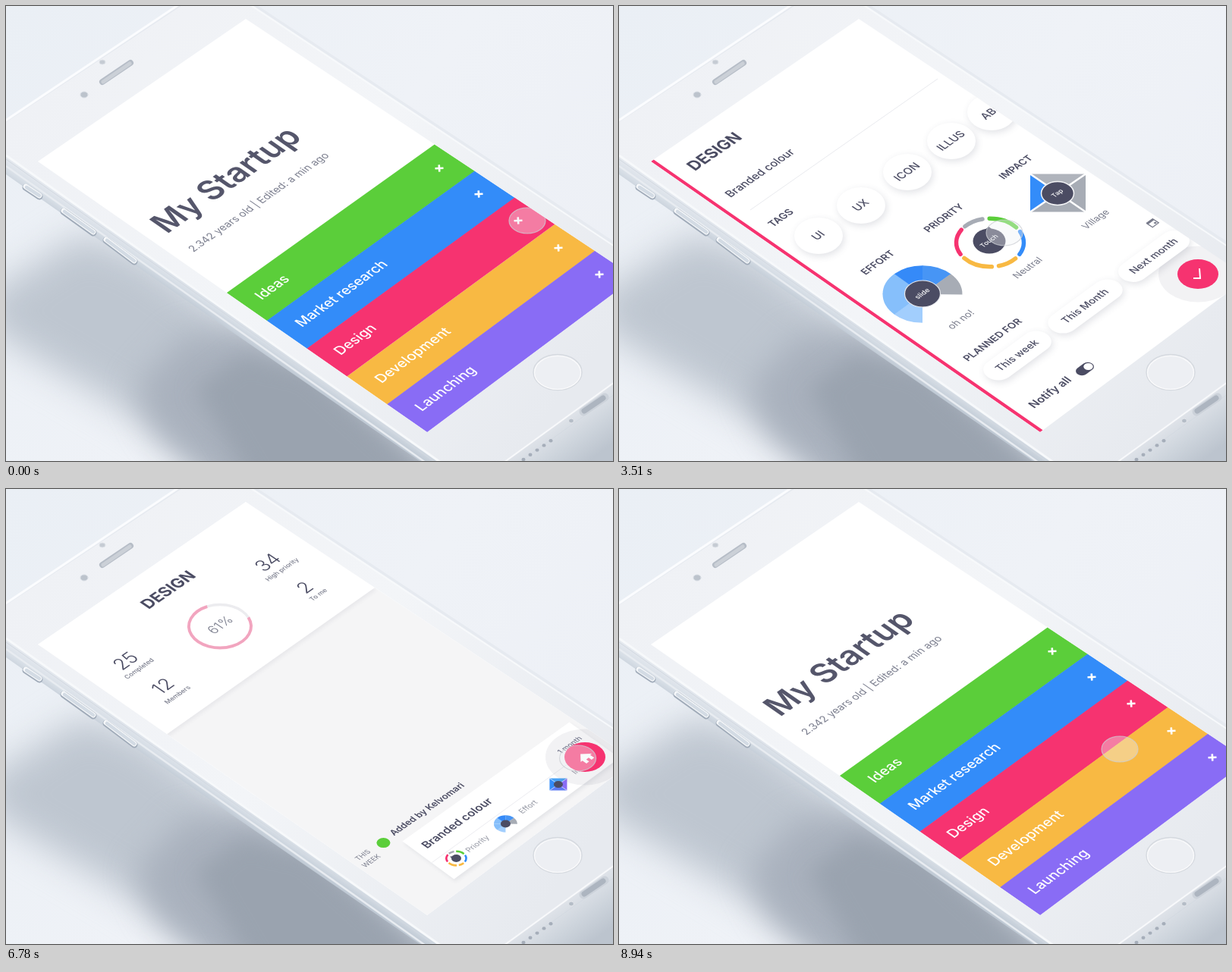
These frames come from a looping animation (800x600 px, 8.97 s). An HTML page with a canvas:

```html
<!DOCTYPE html>
<html lang="en">
<head>
<meta charset="utf-8">
<title>Startup planner</title>
<style>
html, body { margin: 0; width: 100%; height: 100%; overflow: hidden; background: #edf1f6; }
canvas { display: block; width: 800px; height: 600px; }
</style>
</head>
<body>
<canvas id="stage" width="800" height="600"></canvas>
<script>
const LOOP = 8970, W = 375, H = 667, SKEW = 6.4e-5, RAD = Math.PI / 180;
const PINK = '#f63370', BLUE = '#338cf9', GREEN = '#5bce3a', ORANGE = '#f8b943', PURPLE = '#896cf5';
const INK = '#4b4c63', GREY = '#a7acb5', SOFT = '#777a8a';
const canvas = document.getElementById('stage');
let ctx = canvas.getContext('2d');
let ox = 0, oy = 0;

const clamp = v => Math.max(0, Math.min(1, v));
const ramp = (t, a, b) => clamp((t - a) / (b - a));
const mix = (a, b, p) => a + (b - a) * p;
const inOut = p => p < .5 ? 4 * p * p * p : 1 - Math.pow(2 - 2 * p, 3) / 2;
const out = p => 1 - Math.pow(1 - p, 3);

// Tilted phone screen: screen units to stage pixels, and back
function project(X, Y) {
  return [42 + .7307 * X + .7691 * Y, 205 - .5013 * X + .5352 * Y - SKEW * X * Y];
}
function unproject(x, y) {
  let X = 0, Y = 0;
  for (let i = 0; i < 4; i++) {
    const dx = x - 42, dy = y - 205 + SKEW * X * Y;
    X = .6891 * dx - .9903 * dy;
    Y = .6455 * dx + .9409 * dy;
  }
  return [X, Y];
}
// Local tilted axes with their origin at a stage point
function at(x, y) {
  const [X, Y] = unproject(x, y);
  ctx.setTransform(.7307, -.5013 - SKEW * Y, .7691, .5352 - SKEW * X, x + ox, y + oy);
}
function flat() { ctx.setTransform(1, 0, 0, 1, ox, oy); }
// Moves what follows down the screen by some units
function shift(units) {
  ox = .7691 * units;
  oy = .5345 * units;
  flat();
}

function poly(points, fill) {
  ctx.beginPath();
  points.forEach(p => ctx.lineTo(p[0], p[1]));
  ctx.closePath();
  if (fill) { ctx.fillStyle = fill; ctx.fill(); }
}
function panel(X, Y, w, h, fill) {
  flat();
  poly([project(X, Y), project(X + w, Y), project(X + w, Y + h), project(X, Y + h)], fill);
}
function line(x1, y1, x2, y2, color, width) {
  ctx.beginPath();
  ctx.moveTo(x1, y1);
  ctx.lineTo(x2, y2);
  ctx.strokeStyle = color;
  ctx.lineWidth = width;
  ctx.stroke();
}
function oval(x, y, rx, ry, fill, stroke, width) {
  ctx.beginPath();
  ctx.ellipse(x, y, rx, ry, 0, 0, 7);
  if (fill) { ctx.fillStyle = fill; ctx.fill(); }
  if (stroke) { ctx.strokeStyle = stroke; ctx.lineWidth = width || 1; ctx.stroke(); }
}
function text(s, x, y, size, weight, color, align) {
  at(x, y);
  ctx.font = `${weight} ${size}px Inter, "Open Sans", sans-serif`;
  ctx.textAlign = align || 'left';
  ctx.textBaseline = align ? 'middle' : 'alphabetic';
  ctx.fillStyle = color;
  ctx.fillText(s, 0, 0);
  flat();
}
function shadow(alpha, blur = 10) {
  ctx.shadowColor = `rgba(70,75,100,${alpha})`;
  ctx.shadowBlur = alpha ? blur : 0;
  ctx.shadowOffsetX = alpha ? 2 : 0;
  ctx.shadowOffsetY = alpha ? 3 : 0;
}
function capsule(x, y, w, h, fill) {
  at(x, y);
  ctx.beginPath();
  ctx.roundRect(-w / 2, -h / 2, w, h, h / 2);
  ctx.fillStyle = fill;
  ctx.fill();
  flat();
}
function gradient(x1, y1, x2, y2, ...colors) {
  const g = ctx.createLinearGradient(x1, y1, x2, y2);
  colors.forEach((c, i) => g.addColorStop(i / (colors.length - 1), c));
  return g;
}

function paintPhone() {
  const layer = document.createElement('canvas');
  layer.width = 800;
  layer.height = 600;
  const main = ctx;
  ctx = layer.getContext('2d');
  ctx.fillStyle = gradient(0, 0, 800, 600, '#eaeff5', '#eff2f7', '#eceff5');
  ctx.fillRect(0, 0, 800, 600);

  ctx.filter = 'blur(24px)';
  poly([[-40, 390], [100, 300], [180, 330], [620, 640], [330, 650], [160, 535], [-10, 435]], '#bec6d0');
  ctx.filter = 'blur(20px)';
  poly([[170, 505], [235, 435], [330, 430], [600, 640], [300, 650], [200, 565]], '#a9b1bd');
  ctx.filter = 'blur(14px)';
  poly([[250, 505], [310, 460], [400, 480], [580, 640], [330, 640]], '#9aa3af');
  ctx.filter = 'none';

  // Body: left side, bottom side, then the front face
  poly([[-10, 157], [240, -10], [310, -15], [802, 311], [802, 602], [548, 602], [172, 343], [0, 222], [-10, 212]],
    gradient(200, 332, 184, 356, '#e6eaf0', '#d7dee6', '#bfc9d4'));
  poly([[573, 602], [802, 440], [802, 602]], gradient(728, 550, 765, 602, '#dfe3e9', '#cdd4dc', '#bcc4ce'));
  poly([[-10, 160], [240, -6], [310, -11], [800, 314], [800, 497], [656, 602], [573, 602], [291, 401], [0, 196], [-10, 187]],
    gradient(60, 80, 700, 560, '#eff1f5', '#f3f5f8', '#e7eaef'));
  line(-5, 154, 234, -6, '#fbfcfe', 3);
  line(312, -8, 802, 317, '#f7f9fb', 2);
  line(0, 197, 573, 602, '#f7f9fb', 3);
  line(0, 202, 566, 602, '#d2d8e0', 1);
  line(0, 211, 553, 602, '#e8ecf1', 2.5);
  line(656, 602, 802, 496, '#f8f9fb', 2);
  line(676, 602, 802, 512, '#d3d9e1', 1);

  // Earpiece and sensors
  ctx.lineCap = 'round';
  line(127, 100, 164, 75, '#b6bdc7', 8);
  line(128, 100, 163, 76, '#cbd0d7', 5);
  oval(103, 117, 5, 4, '#bcc3cc', '#d8dde4', 1);
  oval(127, 74, 4, 3, '#c5cbd3', '#dde1e7', 1);
  // Side buttons
  for (const [x1, y1, x2, y2] of [[26, 238, 44, 250], [76, 270, 115, 298], [132, 308, 169, 336]]) {
    line(x1, y1 + 1, x2, y2 + 1, '#a0abb9', 9);
    line(x1, y1, x2, y2, '#f6f8fa', 7);
    line(x1 + 1, y1 + 1, x2, y2, '#d3dbe4', 4.5);
  }
  // Home button
  oval(727, 483, 32, 23.5, '#eceef2', '#d6dae0', 1.4);
  oval(727, 483.5, 30.5, 22, '#edeff3', '#fbfbfc', 1.2);
  // Bottom edge details
  line(761, 535, 789, 516, '#ccd2da', 11);
  line(762, 534, 787, 517, '#adb5c0', 7);
  oval(745, 547, 3.5, 3, '#b5bdc7', '#e3e6eb', 1);
  for (let i = 0; i < 5; i++) oval(682 + i * 9, 598 - i * 6.2, 2.5, 2.2, '#a6aeba');
  ctx = main;
  return layer;
}
const phone = paintPhone();

const bands = [
  ['Ideas', GREEN, 337, 388, 571, 214],
  ['Market research', BLUE, 390, 424, 623, 248],
  ['Design', PINK, 441, 461, 675, 283],
  ['Development', ORANGE, 495, 498, 728, 319],
  ['Launching', PURPLE, 548, 535, 782, 354]
];
const BAND_TOP = 323.5, BAND = (H - BAND_TOP) / 5;

function heading(alpha) {
  ctx.globalAlpha = alpha;
  text('My Startup', 212, 301, 46, 600, '#55566b');
  text('2.342 years old | Edited: a min ago', 247, 325, 15, 400, '#7b7e8e');
  ctx.globalAlpha = 1;
}
function bandLabel([name, , tx, ty, x, y], alpha) {
  ctx.globalAlpha = alpha;
  text(name, tx, ty, 20, 500, '#fff');
  ctx.lineCap = 'butt';
  line(x - 5.5, y + .3, x + 5.5, y - .3, '#fff', 2.4);
  line(x - .3, y - 4.6, x + .3, y + 4.6, '#fff', 2.6);
  ctx.globalAlpha = 1;
}
function homeOpen(t) {
  const fade = 1 - ramp(t, 60, 340), side = 1 - inOut(ramp(t, 100, 500));
  heading(fade);
  bands.forEach((b, i) => {
    if (i !== 2) panel(0, BAND_TOP + i * BAND, W * side, BAND + .5, b[1]);
  });
  const grow = inOut(ramp(t, 100, 620)), top = BAND_TOP + 2 * BAND;
  const w = mix(W, 5, inOut(ramp(t, 180, 850)));
  panel(0, mix(top, 0, grow), w, mix(BAND, H, grow), PINK);
  bands.forEach(b => bandLabel(b, fade));
}
function homeReturn(t) {
  heading(ramp(t, 8180, 8600));
  bands.forEach((b, i) => {
    shift(400 * (1 - out(ramp(t, 8060 + i * 70, 8480 + i * 70))));
    panel(0, BAND_TOP + i * BAND, W, BAND + .5, b[1]);
    bandLabel(b, 1);
  });
  shift(0);
}

// Effort dial: six slices of 45 degrees, open at the lower right
const dialBlues = ['#a2cefd', '#86bffb', '#86bffb', '#358af8', '#4795f5', '#2f7fec'];
function dial(x, y, rx, count) {
  const ry = rx * .72;
  for (let i = 0; i < 6; i++) {
    ctx.beginPath();
    ctx.moveTo(x, y);
    ctx.ellipse(x, y, rx, ry, 0, (90 + i * 45) * RAD, (135.6 + i * 45) * RAD);
    ctx.closePath();
    ctx.fillStyle = i < count ? dialBlues[i] : GREY;
    ctx.fill();
  }
}
const arcs = [
  [222, 257, GREY], [269, 321, GREEN], [333, 389, BLUE],
  [41, 75, ORANGE], [87, 140, ORANGE], [151, 212, PINK]
];
function ring(x, y, rx, width, colors, lift = 0) {
  ctx.lineCap = width > 4 ? 'round' : 'butt';
  arcs.forEach(([a, b, color], i) => {
    const up = i === 5 ? lift : 0;
    ctx.beginPath();
    ctx.ellipse(x - 6 * up, y - up, rx, rx * .715, 0, a * RAD, b * RAD);
    ctx.strokeStyle = colors && !colors.includes(i) ? GREY : color;
    ctx.lineWidth = width + 3 * up;
    ctx.stroke();
  });
}
function pointer(x, y, angle, reach, r) {
  const spot = (a, k) => [x + Math.cos(a * RAD) * r * k, y + Math.sin(a * RAD) * r * .76 * k];
  poly([spot(angle - 18, .9), spot(angle, reach), spot(angle + 18, .9)], INK);
}
// Impact tile: left, top, right, bottom triangles
function tile(x, y, w, h, colors, gap) {
  const c = [[x - w, y - h], [x + w, y - h], [x + w, y + h], [x - w, y + h]];
  const order = [[3, 0], [0, 1], [1, 2], [2, 3]];
  order.forEach(([a, b], i) => poly([c[a], c[b], [x, y]], colors[i]));
  ctx.lineCap = 'butt';
  if (gap) for (const i of [0, 1]) line(...c[i], ...c[i + 2], '#fff', gap);
}

function touchAngle(t) { return mix(112, 322, inOut(ramp(t, 2150, 3000))); }
function dragSpot(t) {
  const a = touchAngle(t) * RAD;
  return [400 + 38 * Math.cos(a), 380 + 27 * Math.sin(a)];
}

function details(t) {
  const fade = 1 - ramp(t, 6330, 6580);
  if (t > 800) panel(0, 0, 5 * (1 - inOut(ramp(t, 6330, 6650))), H, PINK);
  const row = (i, draw) => {
    const e = out(ramp(t, 430 + i * 75, 780 + i * 75));
    if (!e || !fade) return;
    ctx.globalAlpha = e * fade;
    shift(34 * (1 - e));
    draw();
    shift(0);
    ctx.globalAlpha = 1;
  };
  row(0, () => {
    text('DESIGN', 100, 218, 23, 700, INK);
    text('Branded colour', 147, 253, 16, 500, INK);
    line(173, 269, 420, 96, '#e9eaee', 1);
  });
  row(1, () => {
    text('TAGS', 203, 292, 14.5, 600, INK);
    [['UI', 263, 303], ['UX', 319, 263], ['ICON', 380, 219], ['ILLUS', 438, 178], ['ABS', 491, 140]].forEach(([s, x, y]) => {
      shadow(.16);
      oval(x, y, 32, 24, '#fff');
      shadow(0);
      text(s, x, y, 15.5, 500, INK, 'center');
    });
  });
  row(2, () => {
    text('EFFORT', 325, 355, 14, 600, INK);
    const n = t < 2150 ? 1 : Math.min(5, 1 + Math.floor((touchAngle(t) - 95) / 45));
    dial(400, 380, 52.5, n);
    oval(400, 379.5, 23.5, 17.5, INK, '#e9ebef', 1.2);
    text('slide', 400, 379.5, 10, 500, '#fff', 'center');
    if (n < 4) text('ok', 447, 419, 14, 400, SOFT);
    else text('oh no!', 439, 427, 14, 400, SOFT);
  });
  row(3, () => {
    text('PRIORITY', 408, 299, 14, 600, INK);
    const turn = inOut(ramp(t, 4230, 4450));
    ring(489, 312, 44.5, 5.5, null, turn);
    pointer(488, 310, mix(268, 188, turn), 1.18, 21.5);
    oval(488, 310, 21.5, 16.5, INK);
    text('Touch', 488, 310, 9.5, 500, '#fff', 'center');
    if (turn < .5) text('Neutral', 525, 360, 13.5, 400, SOFT);
    else text('High', 529, 356, 13.5, 400, SOFT);
  });
  row(4, () => {
    text('IMPACT', 507, 229, 14, 600, INK);
    tile(578.5, 246.5, 36.5, 25, [
      BLUE, t > 5380 ? '#4aa3f5' : '#b0b4bc', t > 5630 ? PURPLE : GREY, t > 5880 ? '#5f7cf3' : GREY
    ], 2.5);
    oval(578, 247, 21.5, 15.5, INK, '#f4f5f7', 1.5);
    text('Tap', 578, 247, 9.5, 500, '#fff', 'center');
    text('Village', 616, 295, 13.5, 400, SOFT);
  });
  row(5, () => {
    oval(763, 353.5, 52, 37, 'rgba(110,110,130,.09)');
    text('PLANNED FOR', 460, 469, 14, 600, INK);
    [['This week', 525, 461, 106], ['This Month', 614.5, 396, 118], ['Next month', 705, 330, 112]].forEach(([s, x, y, w]) => {
      shadow(.16);
      capsule(x, y, w, 37, '#fff');
      shadow(0);
      text(s, x, y, 14.5, 500, INK, 'center');
    });
    at(703, 286);
    ctx.strokeStyle = SOFT;
    ctx.lineWidth = 1.4;
    ctx.strokeRect(-5.5, -4.5, 11, 10);
    ctx.fillStyle = SOFT;
    ctx.fillRect(-5.5, -5.5, 11, 3.5);
    ctx.fillRect(1, 1, 3, 3);
    flat();
  });
  row(6, () => {
    text('Notify all', 547, 531, 16, 600, INK);
    capsule(614, 478.5, 26, 15, INK);
    oval(618.5, 475.5, 6.2, 4.6, '#fff');
  });
}

const cards = [
  { title: 'Branded colour', x: 0, y: 0, due: '1 month', dot: [265, 305], color: GREEN, when: ['THIS', 'WEEK'],
    dial: 5, ring: null, tile: [BLUE, '#4aa3f5', PURPLE, '#5f7cf3'] },
  { title: 'Home page revamp', x: 93, y: 64, due: '2 month', dot: [363, 373], color: BLUE, when: ['PAST', 'WEEK'],
    dial: 3, ring: [1], tile: [BLUE, '#8d97a8', GREY, '#9298a5'] },
  { title: 'Logo design', x: 188, y: 129, due: '1 week', dot: [463, 441], color: '#8d92a0', when: ['AUG'],
    dial: 1, ring: [1, 2], tile: [BLUE, '#8d97a8', GREY, '#9298a5'] },
  { title: 'Iconography', x: 283, y: 195, due: '4 month', dot: [565, 512], color: '#8d92a0', when: ['MAY'],
    dial: 2, ring: [2], tile: [BLUE, GREY, GREY, GREY] }
];
function card(c, i) {
  const { x, y } = c, lean = i * 1.5;
  shadow(.09, 5);
  poly([[290 + x, 303 + y], [510 + x, 146 + y - lean], [576 + x, 193 + y - lean], [358 + x, 353 + y]], '#fff');
  shadow(0);
  line(329 + x, 331 + y, 545 + x, 174 + y - lean, '#ececf0', 1);
  text(c.title, 322.5 + x, 313 + y, 16.2, 600, INK);
  text(c.due, 499 + x, 188 + y - lean * .6, 10.5, 500, '#71748a');
  ring(361 + x, 325.5 + y, 13, 2.6, c.ring);
  pointer(361 + x, 325.5 + y, i ? 290 : 200, 1.4, 6.5);
  oval(361 + x, 325.5 + y, 6.5, 5, INK);
  dial(426 + x, 280 + y, 15.5, c.dial);
  oval(426 + x, 280 + y, 6.5, 5, INK);
  tile(495.5 + x, 228 + y, 11.5, 8, c.tile, .5);
  oval(495.5 + x, 228 + y, 6, 4.5, INK);
  text('Priority', 378 + x, 318 + y, 11, 400, '#9295a1');
  text('Effort', 448 + x, 267 + y, 11, 400, '#9295a1');
  text('Impact', 518 + x, 215 + y, 11, 400, '#9295a1');
  const [dx, dy] = c.dot;
  oval(dx, dy, 9, 6.5, c.color);
  if (c.when.length > 1) {
    text(c.when[0], dx - 33, dy + 24, 10, 400, SOFT);
    text(c.when[1], dx - 24, dy + 33, 10, 400, SOFT);
  } else text(c.when[0], dx - 31, dy + 28, 10, 400, SOFT);
}

const stats = [
  ['25', 153, 240, 'Completed', 160, 251], ['12', 204, 272, 'Members', 213, 284],
  ['34', 340, 110, 'High priority', 346, 122], ['2', 395, 139, 'To me', 404, 148]
];
function dashboard(t) {
  const alpha = ramp(t, 6440, 6680) * (1 - ramp(t, 7680, 8050));
  if (!alpha) return;
  ctx.globalAlpha = alpha;
  panel(0, 221, W, H - 221, '#f5f5f6');
  ctx.save();
  panel(0, 221, W, H);
  ctx.clip();
  const slide = i => shift(448 * (1 - out(ramp(t, 6690 + i * 40, 7430 + i * 10))));
  cards.forEach((c, i) => {
    slide(i);
    card(c, i);
  });
  slide(0);
  text('Added by Kelvomari', 279, 296, 13.2, 600, INK);
  shift(0);
  ctx.restore();
  shadow(.07, 5);
  panel(0, 0, W, 221, '#fff');
  shadow(0);
  text('DESIGN', 188, 159, 23, 700, INK);
  stats.forEach(([n, x, y, s, sx, sy]) => {
    text(n, x, y, 27, 300, INK);
    text(s, sx, sy, 9.4, 500, SOFT);
  });
  text('61%', 274, 192, 19, 300, SOFT);
  const turn = -72 * (1 - inOut(ramp(t, 6640, 7300)));
  ctx.lineCap = 'butt';
  oval(282, 181, 41, 28.5, null, '#ececef', 3.5);
  ctx.globalAlpha = alpha * mix(.28, 1, ramp(t, 6700, 7250));
  ctx.beginPath();
  ctx.ellipse(282, 181, 41, 28.5, 0, (45 + turn) * RAD, (315 + turn) * RAD);
  ctx.strokeStyle = PINK;
  ctx.lineWidth = 4;
  ctx.stroke();
  ctx.globalAlpha = 1;
}

function actionButton(t) {
  const size = out(ramp(t, 700, 1000)) * (1 - inOut(ramp(t, 7700, 8050)));
  if (!size) return;
  flat();
  const halo = mix(.09, .02, ramp(t, 6900, 7400));
  if (t > 6330) oval(763, 353.5, 52 * size, 37 * size, `rgba(110,110,130,${halo})`);
  oval(763, 353.5, 27 * size, 19.5 * size, PINK);
  const swap = ramp(t, 6350, 6600);
  ctx.lineCap = 'butt';
  ctx.globalAlpha = size * (1 - swap);
  ctx.beginPath();
  ctx.moveTo(757, 359);
  ctx.lineTo(766, 359);
  ctx.lineTo(765, 346);
  ctx.strokeStyle = '#fff';
  ctx.lineWidth = 2;
  ctx.stroke();
  ctx.globalAlpha = size * swap;
  at(764, 354);
  poly([[-10, 1], [0, -9], [10, 1], [7, 1], [7, 8], [2.2, 8], [2.2, 3], [-2.2, 3], [-2.2, 8], [-7, 8], [-7, 1]], '#fff');
  flat();
  ctx.globalAlpha = 1;
}

const path = [
  [0, 687, 283], [350, 687, 283], [1850, 431, 372], [1920, 431, 372], [2150, ...dragSpot(0)],
  [3000, ...dragSpot(LOOP)], [3450, 508, 299], [3750, 508, 299], [4180, 449, 308], [4480, 449, 308],
  [4880, 547, 258], [5150, 547, 258], [5350, 578, 232], [5600, 604, 248], [5850, 578, 264],
  [6250, 753, 355], [7250, 754, 355], [8150, 754, 355], [8940, 660, 343], [LOOP, 660, 343]
];
function touch(t) {
  let x, y;
  if (t > 2150 && t < 3000) [x, y] = dragSpot(t);
  else {
    const i = path.findIndex(k => k[0] > t), a = path[i - 1], b = path[i];
    const p = inOut(ramp(t, a[0], b[0]));
    x = mix(a[1], b[1], p);
    y = mix(a[2], b[2], p);
  }
  flat();
  oval(x, y, 24, 17, 'rgba(240,241,244,.38)', 'rgba(205,207,213,.75)', 1.2);
}

function draw(t) {
  flat();
  ctx.drawImage(phone, 0, 0);
  ctx.save();
  panel(0, 0, W, H, '#fff');
  ctx.clip();
  if (t < 900) homeOpen(t);
  if (t < 6700) details(t);
  dashboard(t);
  if (t > 8050) homeReturn(t);
  actionButton(t);
  touch(t);
  ctx.restore();
}

const start = performance.now();
function frame(now) {
  draw(Math.max(0, now - start) % LOOP);
  requestAnimationFrame(frame);
}
draw(0);
requestAnimationFrame(frame);
</script>
</body>
</html>
```
